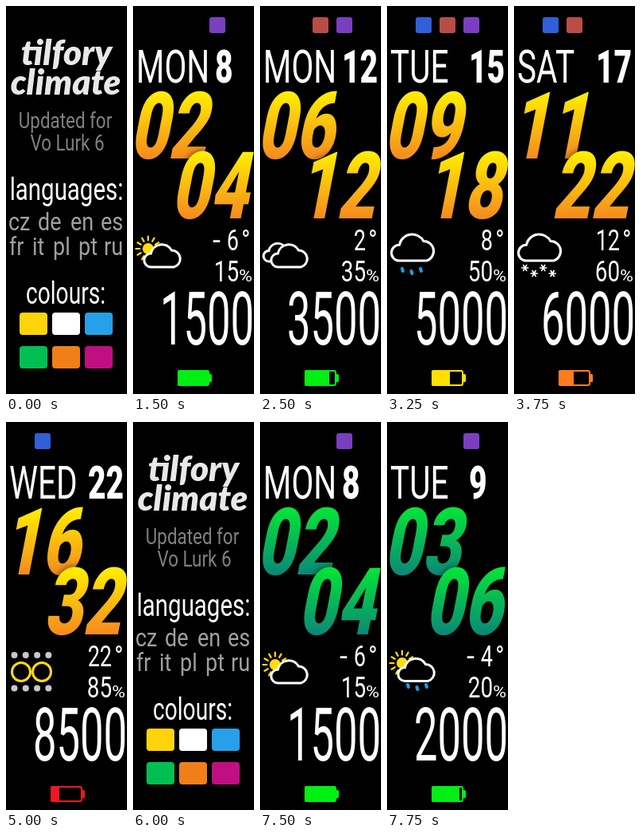
These frames come from a looping animation (152 px wide and 486 px high, 8000 ms). An HTML page:

```html
<!DOCTYPE html>
<html lang="en">
<head>
<meta charset="utf-8">
<title>Watch face preview</title>
<style>
  html, body { margin: 0; width: 100%; height: 100%; overflow: hidden; background: #000; }
  svg { display: block; width: 100vw; height: 100vh; }
  text { font-family: Roboto, sans-serif; fill: #fff; white-space: pre; }
  .title { font-family: Lato, sans-serif; font-weight: 900; font-style: italic; fill: #e8e8e8; }
  .dim { fill: #808080; }
  .soft { fill: #a0a0a0; }
  .bold { font-weight: 900; }
  .amber { font-weight: 900; fill: url(#amber); }
  .green { font-weight: 900; fill: url(#green); }
  .front { filter: drop-shadow(0 0 4px rgba(0, 0, 0, .65)); }
  .line { fill: none; stroke-width: 3; stroke-linecap: round; vector-effect: non-scaling-stroke; }
</style>
</head>
<body>
<svg viewBox="0 0 152 486">
  <defs>
    <linearGradient id="amber" gradientUnits="userSpaceOnUse" x1="0" y1="-84" x2="0" y2="0">
      <stop stop-color="#fff000"/><stop offset="1" stop-color="#f58a1f"/>
    </linearGradient>
    <linearGradient id="green" gradientUnits="userSpaceOnUse" x1="0" y1="-84" x2="0" y2="0">
      <stop stop-color="#04e636"/><stop offset="1" stop-color="#0b8878"/>
    </linearGradient>
  </defs>
  <g id="stage"></g>
</svg>
<script>
const STEP = 250, LOOP = 8000;
const DAYS = ['SUN', 'MON', 'TUE', 'WED', 'THU', 'FRI', 'SAT'];
const YELLOW = '#ffdc0a', BLUE = '#1b9fe8', GREY = '#c8c8c8';

const range = n => [...Array(n).keys()];
const repeat = (n, draw) => range(n).map(draw).join('');
const two = n => String(n).padStart(2, '0');

// Condensed lettering: each style has one narrowing factor.
const text = (x, y, string, size, narrow, style = '', anchor = 'start', skew = 0) =>
  `<text class="${style}" font-size="${size}" text-anchor="${anchor}"
    transform="translate(${x} ${y}) skewX(${skew}) scale(${narrow} 1)">${string}</text>`;
const box = (x, y, w, h, fill, r = 0) =>
  `<rect x="${x}" y="${y}" width="${w}" height="${h}" rx="${r}" fill="${fill}"/>`;
const path = (d, color, extra = '') => `<path class="line" d="${d}" stroke="${color}" ${extra}/>`;
const dot = (x, y, r, color) => `<circle cx="${x}" cy="${y}" r="${r}" fill="${color}"/>`;
const ring = (x, y, r, color) => `<circle class="line" cx="${x}" cy="${y}" r="${r}" stroke="${color}"/>`;

const spokes = (x, y, from, to, count, color, width) => path(repeat(count, i => {
  const a = i * 2 * Math.PI / count, c = Math.cos(a), s = Math.sin(a);
  return `M${x + from * c} ${y + from * s}L${x + to * c} ${y + to * s}`;
}), color, `style="stroke-width:${width}"`);

const cloud = (x, y, scale) => path(
  'M9 30A8.5 8.5 0 0 1 9 13A14 14 0 0 1 35 9A10.7 10.7 0 0 1 38 30Z', '#fff',
  `transform="translate(${x} ${y}) scale(${scale})" style="fill:#000"`);
const sun = (x, y, r) => dot(x, y, r, YELLOW) + spokes(x, y, r * 1.5, r * 2.2, 12, YELLOW, 2.2);
const flake = (x, y) => spokes(x, y, 0, 4, 6, '#fff', 1.7);
const drop = (x, y) => path(`M${x - .5} ${y + 1}l1 3`, BLUE, 'style="stroke-width:4"');
const falling = (shapes, mid = 31) => shapes.map((shape, i) =>
  shape(mid + (i - (shapes.length - 1) / 2) * 11.5, 328 + i % 2 * (shape === drop ? 3 : 7))).join('');

const smallCloud = cloud(13.5, 297, 1);
const sunCloud = sun(19, 304, 7) + smallCloud;
const showerCloud = sun(19, 302, 7) + cloud(13.5, 294.5, 1);
const bigCloud = cloud(5, 284, 1.17);
const rain = n => bigCloud + falling(Array(n).fill(drop));
const snow = n => bigCloud + falling(Array(n).fill(flake));
const dots = (y, color) => repeat(4, i => dot(10.5 + i * 14.3, y, 4, color));
const bars = (color, bend) => repeat(4, i =>
  path(`M8 ${297 + i * 11}q12 ${-bend} 24 0t24 0`, color));

const WEATHER = [
  sunCloud,
  showerCloud + falling([drop, drop, drop], 38),
  showerCloud + falling([flake, flake, flake], 38),
  sun(32, 313, 11),
  cloud(4, 296, .8) + smallCloud,
  rain(2), snow(2), rain(3), snow(3), snow(4), rain(4),
  bars(YELLOW, 8),
  bigCloud + falling([drop, flake, drop, flake]),
  bars(GREY, 0),
  dots(292, GREY) + dots(333.5, GREY) + ring(19, 313, 11.5, YELLOW) + ring(45, 313, 11.5, YELLOW),
  bigCloud + path('M34 318l-7 9h9l-7 10', YELLOW),
  snow(4),
  dots(299, YELLOW) + dots(313, GREY) + dots(327, YELLOW),
];

function cover() {
  const languages = [
    [281, { cz: 3, de: 40, en: 81, es: 119 }],
    [312, { fr: 4, it: 33, pl: 59, pt: 91, ru: 123 }],
  ];
  const swatches = ['#ffd30a', '#fff', '#26a0e8', '#00bf52', '#f07f19', '#bf0f80'];
  return text(76, 74, 'tilfory', 44, 1, 'title', 'middle')
    + text(75, 111, 'climate', 44, 1, 'title', 'middle')
    + text(74.5, 153, 'Updated for', 27, .83, 'dim', 'middle')
    + text(77, 181, 'Vo Lurk 6', 27, .83, 'dim', 'middle')
    + text(76, 243, 'languages:', 38, .775, '', 'middle')
    + languages.map(([y, words]) => Object.entries(words)
        .map(([word, x]) => text(x, y, word, 31, .87, 'soft')).join('')).join('')
    + text(75, 373, 'colours:', 38, .74, '', 'middle')
    + swatches.map((c, i) => box(17 + i % 3 * 41, i < 3 ? 384 : 426, 35, 28, c, 4)).join('');
}

function battery(used) {
  const color = ['#00f014', '#ffe000', '#ff7d1e', '#f01820'][
    Math.min(3, Math.max(0, Math.floor((used - 1) / 2)))];
  return `<rect x="57" y="457" width="38" height="18" rx="2" fill="none" stroke="${color}" stroke-width="2"/>`
    + box(56, 456, 39 - 4 * used, 20, color, 2) + box(95, 461, 4, 10, color, 1.5);
}

function face(k, theme) {
  const half = Math.ceil(k / 2);
  const weekday = DAYS[new Date(Date.UTC(2021, 1 + half, 8 + k)).getUTCDay()];
  const temperature = 2 * k - 6;
  const status = [
    [36, '#3060d8', k >= 6 && k < 15],
    [66, '#b84d48', k >= 2 && k < 11],
    [96, '#7a3fc0', k < 9],
  ];
  return status.map(([x, color, on]) => on ? box(x, 14, 20, 20, color, 3) : '').join('')
    + text(4, 96, weekday, 58, .7)
    + text(103, 96, 8 + k, 58, .67, 'bold')
    + text(-5, 191, two(2 + k), 117, .715, theme, 'start', -11)
    + `<g class="front">${text(47, 266, two(4 + 2 * k), 117, .715, theme, 'start', -11)}</g>`
    + WEATHER[k]
    + (temperature < 0 ? text(100, 306, '-', 36, 1) : '')
    + text(133, 306, Math.abs(temperature), 36, .75, '', 'end')
    + text(136, 306, '°', 36, .85)
    + text(133, 345, 15 + 5 * k, 37, .75, '', 'end')
    + text(133, 345, '%', 21, 1.1)
    + text(152, 424, 1500 + 500 * k, 93, .565, '', 'end')
    + battery(half);
}

function scene(step) {
  if (step >= 30) return face(step - 30, 'green');
  if (step >= 6 && step < 24) return face(step - 6, 'amber');
  return cover();
}

const stage = document.getElementById('stage');
let shown = -1;
function tick() {
  const step = Math.floor(performance.now() % LOOP / STEP);
  if (step !== shown) stage.innerHTML = scene(shown = step);
  requestAnimationFrame(tick);
}
tick();
</script>
</body>
</html>
```
